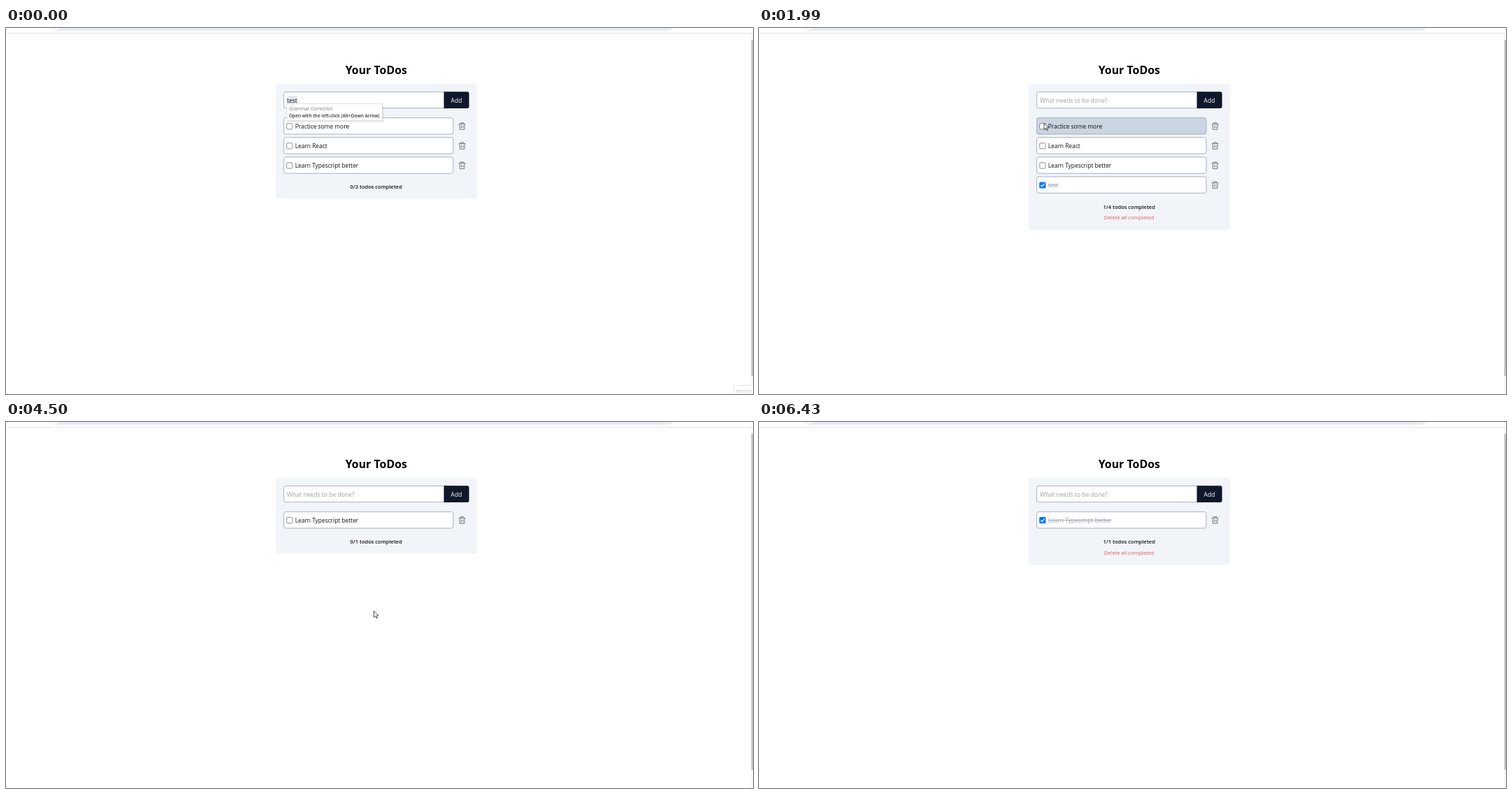
Animation of 1069 by 524 pixels, one loop 7220 ms. Source, as an HTML page:

```html
<!DOCTYPE html>
<html lang="en">
<head>
<meta charset="utf-8">
<title>Your ToDos</title>
<style>
  html, body { margin: 0; width: 100%; height: 100%; overflow: hidden; background: #fff; }
  svg { display: block; width: 100vw; height: 100vh; font-family: "Open Sans", "Noto Sans", sans-serif; }
  .field { fill: #fff; stroke: #94a0b0; stroke-width: .8; }
  .icon { fill: none; stroke: #555b63; stroke-width: .8; }
</style>
</head>
<body>
<svg id="stage" viewBox="0 0 1069 524">
  <rect x="63" y="-14" width="893" height="18" rx="9" fill="#e9ebf4"/>
  <circle cx="71.5" cy="-4" r="6.5" fill="#fff"/>
  <path d="M0 7.5H1069" stroke="#e1e3e6"/>
  <rect x="1066" y="8" width="3" height="516" fill="#f7f7f7"/>
  <rect id="thumb" x="1066.5" y="17" width="2.5" height="481"/>
  <text x="529.8" y="65.5" font-size="15.9" font-weight="700" text-anchor="middle">Your ToDos</text>
  <g id="app"></g>
</svg>
<script>
const LOOP = 7220, FRAMES = 109, STEP = LOOP / FRAMES;
const ROW = { x: 397.5, y: 128.6, width: 242.5, height: 23.4, gap: 28.1 };
const app = document.getElementById('app');
const thumb = document.getElementById('thumb');

const ADDED = 14, CLEARED = 66;
const TODOS = [
  { label: 'test', doneAt: 29, from: ADDED, until: CLEARED },
  { label: 'Practice some more', doneAt: 55, from: 0, until: CLEARED },
  { label: 'Learn React', doneAt: 43, from: 0, until: CLEARED },
  { label: 'Learn Typescript better', doneAt: 85, from: 0, until: FRAMES }
];

const rowCentre = index => ROW.y + index * ROW.gap + ROW.height / 2;
const checkboxAt = index => ({ x: 408, y: rowCentre(index) - 4.2 });

// The pointer rests on each spot until it leaves for the next one.
const ENTRY = { x: 1050, y: 500 };
const MOVES = [
  { from: 1, to: 9, spot: { x: 641, y: 98 } },
  { from: 16, to: 22, spot: { x: 437, y: 222 } },
  { from: 22, to: 26, spot: checkboxAt(0) },
  { from: 33, to: 36, spot: checkboxAt(1) },
  { from: 48, to: 51, spot: checkboxAt(0) },
  { from: 56, to: 59, spot: { x: 450, y: 209.5 } },
  { from: 59, to: 61, spot: { x: 526.5, y: 270.5 } },
  { from: 71, to: 79, spot: { x: 443.5, y: 138.5 } },
  { from: 79, to: 82, spot: checkboxAt(0) },
  { from: 90, to: 96, spot: { x: 1064, y: 215 } }
];
const GONE = MOVES[MOVES.length - 1].to + 1;

const clamp = k => Math.max(0, Math.min(1, k));
const smooth = k => k * k * (3 - 2 * k);
const within = (step, from, until) => step >= from && step < until;

function pointerAt(step) {
  if (!within(step, 1, GONE)) return null;
  return MOVES.reduce((at, { from, to, spot }) => {
    const k = smooth(clamp((step - from) / (to - from)));
    return { x: at.x + (spot.x - at.x) * k, y: at.y + (spot.y - at.y) * k };
  }, ENTRY);
}

// Completed items sink to the bottom in the order they were ticked.
function todosAt(step) {
  const present = TODOS.filter(todo => within(step, todo.from, todo.until));
  const open = present.filter(todo => step < todo.doneAt);
  const done = present.filter(todo => step >= todo.doneAt).sort((a, b) => a.doneAt - b.doneAt);
  return { list: [...open, ...done], done: done.length };
}

// Hover styling trails the pointer by one step.
function hoveredRow(step, count) {
  const at = pointerAt(step - 1);
  if (!at || at.x < ROW.x || at.x > ROW.x + ROW.width) return -1;
  const index = Math.floor((at.y - ROW.y) / ROW.gap);
  return index < count && Math.abs(at.y - rowCentre(index)) < ROW.height / 2 ? index : -1;
}

const text = (x, y, size, fill, content, extra = '') =>
  `<text x="${x}" y="${y}" font-size="${size}" fill="${fill}" ${extra}>${content}</text>`;

const checkbox = (y, checked) => checked
  ? `<rect x="401.2" y="${y - 4.6}" width="9.2" height="9.2" rx="1.5" fill="#0075ff"/>
     <path d="M403.2 ${y}l1.9 1.9 3.6-4.2" fill="none" stroke="#fff" stroke-width="1.3"/>`
  : `<rect x="401.7" y="${y - 4.1}" width="8.2" height="8.2" rx="1.4" fill="#fff" stroke="#707070" stroke-width=".8"/>`;

const trash = y => `<path class="icon" transform="translate(652.7 ${y})"
  d="M-4.7-3.1H4.7M-1.9-3.1V-4.8H1.9V-3.1M-3.7-3.1L-3.2 4.8H3.2L3.7-3.1M-1.2-1V2.8M1.2-1V2.8"/>`;

function row(todo, index, done, hovered) {
  const y = rowCentre(index);
  const fill = hovered ? 'style="fill:#cbd5e1"' : '';
  return `<rect class="field" x="${ROW.x}" y="${y - ROW.height / 2}" width="${ROW.width}" height="${ROW.height}" rx="2.7" ${fill}/>`
    + checkbox(y + .4, done)
    + text(413.7, y + 3.5, 8.4, done ? '#9aa3b2' : '#111', todo.label, done ? 'text-decoration="line-through"' : '')
    + trash(y + .2);
}

function inputBar(step) {
  const value = step < ADDED
    ? '<rect x="402" y="97" width="15" height="12" fill="#dfe8f3"/>' + text(402, 106.6, 8.5, '#111', 'test')
    : text(402, 106.6, 8.6, '#98a5a5', 'What needs to be done?');
  return `<rect class="field" x="397.5" y="91.5" width="240" height="23.2" rx="2.7"/>${value}
    <path d="M626.6 91.2H660a2.7 2.7 0 0 1 2.7 2.7V112.3a2.7 2.7 0 0 1-2.7 2.7H626.6z"
      fill="${within(step, 9, 17) ? '#1e293b' : '#0f172a'}"/>`
    + text(644.5, 106.6, 8.6, '#fff', 'Add', 'text-anchor="middle"');
}

const tooltip = () =>
  `<rect x="403.5" y="110" width="137" height="25" rx="1" fill="#000" opacity=".08"/>
   <rect x="402" y="108.3" width="136.5" height="24.3" fill="#fff" stroke="#d5d5d5" stroke-width=".7"/>`
  + text(405, 118.4, 6.5, '#777', 'Grammar Correction')
  + text(405, 127.5, 6.5, '#333', 'Open with the left-click (Alt+Down Arrow)', 'font-weight="600"');

const recordBadge = () =>
  '<rect x="1041.5" y="511.5" width="32" height="16" fill="#fff" stroke="#e6e6e6"/>'
  + text(1045, 521.7, 6.7, '#c2c2c2', 'Record');

function footer(step, list, done, y) {
  const middle = 'text-anchor="middle"';
  const count = text(529.7, y + 2.9, 7.5, '#111', `${done}/${list.length} todos completed`, `${middle} font-weight="600"`);
  if (!done) return count;
  const underline = within(step, 63, CLEARED) ? 'text-decoration="underline"' : '';
  return count + text(529.7, y + 18.8, 7.5, '#ef5350', 'Delete all completed', `${middle} ${underline}`);
}

function pointer({ x, y }, hand) {
  const shape = hand
    ? 'M-1 .8Q0-.6 1 .8V4.5L4.8 5.3Q5.8 5.6 5.7 6.8L5 10.8H-.8L-3.8 7Q-3.3 5.6-1 7.3Z'
    : 'M0 0V9.3L2.2 7.3 3.7 10.7 5.2 10 3.7 6.7H6.5Z';
  return `<path transform="translate(${x} ${y})" d="${shape}" fill="#fff" stroke="#222" stroke-width=".8" stroke-linejoin="round"/>`;
}

function render(step) {
  const { list, done } = todosAt(step);
  const hovered = hoveredRow(step, list.length);
  const footerY = 143.2 + list.length * ROW.gap;
  const cardHeight = footerY + (done ? 33.5 : 17) - 80;
  const at = pointerAt(step);
  const hand = within(step, 8, 17) || within(step, 62, 68);
  app.innerHTML = [
    `<rect x="386" y="80" width="288" height="${cardHeight}" rx="3.5" fill="#f1f5f9"/>`,
    inputBar(step),
    ...list.map((todo, i) => row(todo, i, step >= todo.doneAt, i === hovered)),
    footer(step, list, done, footerY),
    step < 12 ? tooltip() : '',
    step < 2 ? recordBadge() : '',
    at ? pointer(at, hand) : ''
  ].join('');
  thumb.setAttribute('fill', at && at.x > 1060 ? '#a0a0a0' : '#c1c1c1');
}

const start = performance.now();
let shown = -1;
function tick() {
  const time = (performance.now() - start) % LOOP;
  const step = Math.min(FRAMES - 1, Math.floor((time + 4) / STEP));
  if (step !== shown) render(shown = step);
  requestAnimationFrame(tick);
}
tick();
</script>
</body>
</html>
```
